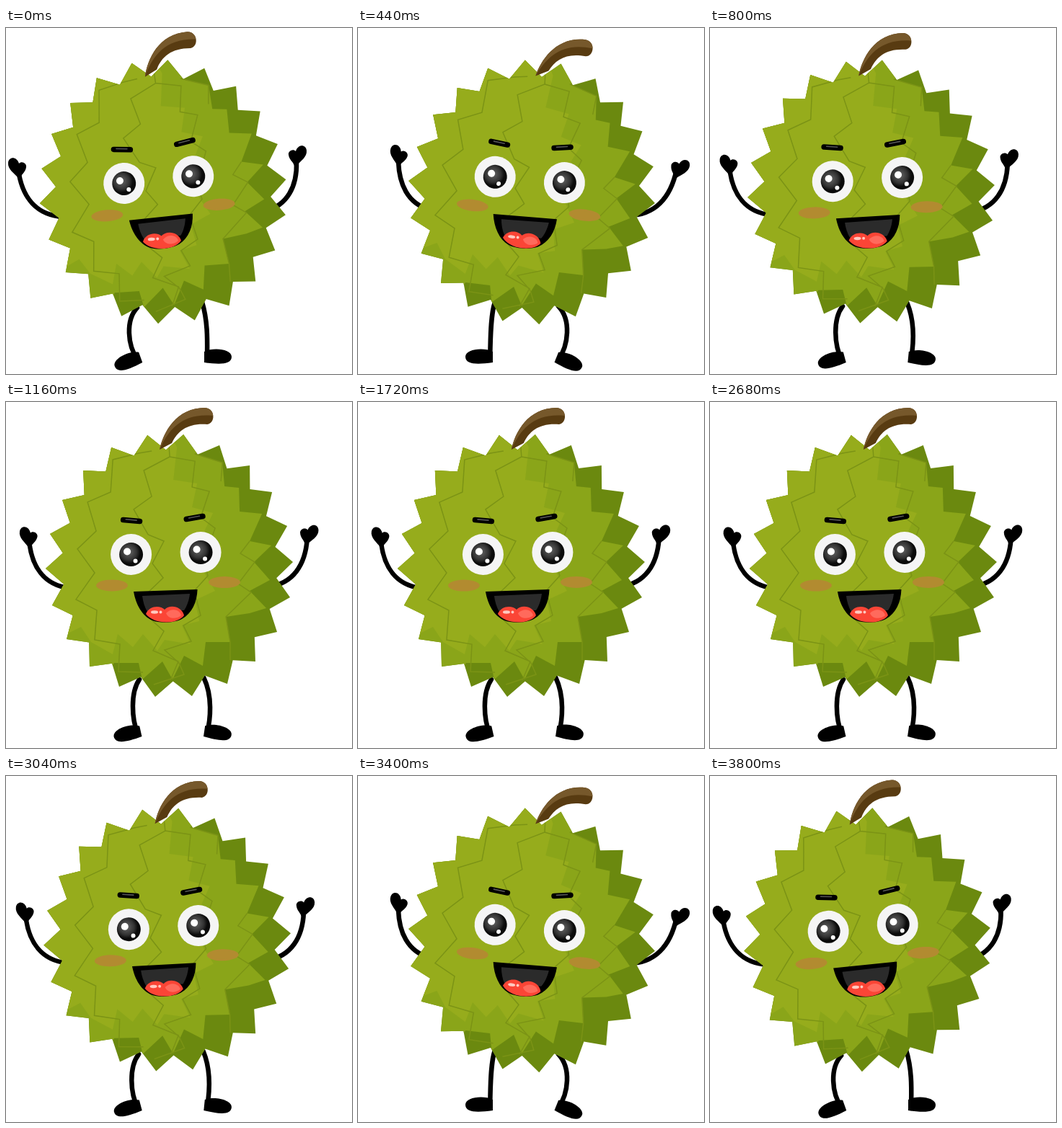
An HTML page for the animation above (3840 ms loop, 480x480 px).

```html
<!DOCTYPE html>
<html lang="en">
<head>
<meta charset="utf-8">
<title>Dancing durian</title>
<style>
  html, body { margin: 0; width: 100%; height: 100%; overflow: hidden; background: #fff; }
  svg { display: block; width: 100vw; height: 100vh; }
  .limb { fill: none; stroke: #000; stroke-width: 6.5; stroke-linecap: round; }
  .seam { fill: none; stroke: #7b9315; stroke-width: 1.5; }
</style>
</head>
<body>
<svg viewBox="0 0 480 480">
  <defs>
    <clipPath id="skin"><path class="shell"/></clipPath>
    <radialGradient id="iris" cx=".4" cy=".4" r=".6">
      <stop offset="0" stop-color="#666"/>
      <stop offset=".55" stop-color="#333"/>
      <stop offset=".8" stop-color="#0b0b0b"/>
    </radialGradient>
    <path id="hand" d="M-1 2C-6-4-16-10-15-19C-14-28-3-28 0-18C4-22 11-18 10-13C9-6 4-4 2 2Z"/>
    <path id="foot" d="M2-8C-12-15-36-11-36-1C-36 10-20 10 2 7Z"/>
    <g id="eye">
      <circle r="28.5" fill="#f5f5f5"/>
      <circle r="16.5" fill="url(#iris)"/>
      <circle cx="-5.5" cy="-4" r="5" fill="#fff"/>
      <circle cx="6" cy="9" r="3" fill="#fff"/>
    </g>
    <g id="brow" stroke-linecap="round">
      <path d="M-11.5 0H11.5" stroke="#000" stroke-width="7.5"/>
      <path d="M-8-1H7" stroke="#555" stroke-width="1.6"/>
    </g>
  </defs>

  <g id="limbs"></g>

  <g id="body">
    <path class="shell" fill="#6b890f"/>
    <g clip-path="url(#skin)">
      <path fill="#8aa519" d="M290 40L296 60L261 72L300 84L303 117L323 119L324 152L355 155L338 193L368 199L344 222L366 247L338 262L361 286L338 293L305 298L311 333L277 333L273 366L247 352L231 385L217 360L189 385L184 362L150 362L130 390H40V40Z"/>
      <path fill="#96ac1c" d="M226 40L237 63L232 108L265 113L258 146L287 154L270 190L300 200L272 232L290 262L262 275L268 304L244 310L256 336L220 330L210 345L190 322L176 340L155 322L148 350L118 333L104 312L84 322L40 300V40Z"/>
      <path class="seam" d="M202 68L184 71L148 80L147 96L145 125L113 139L125 179L99 204L123 237L97 274L126 289L123 330L158 336L156 374L190 375
        M226 62L227 76L191 95L202 131L177 149L197 184L219 193L203 224L218 244L194 267L197 298L219 318L204 345L239 360L228 386
        M227 76L262 82L258 118L282 124L270 160L290 175L274 220L280 241L261 262L270 296L246 310L257 332L220 344L240 362L247 378L205 392
        M262 72L300 84L298 110 M338 193L325 210L345 222L322 252L340 264L305 298L311 333V358"/>
    </g>

    <path fill="#583b11" d="M213 66C218 42 236 8 276 8C290 9 291 29 279 31C252 29 238 40 230 57Z"/>
    <path fill="#76582b" d="M213 66C218 42 236 8 276 8C284 9 287 14 287 19C246 15 226 36 213 66Z"/>

    <use href="#brow" transform="translate(174 164.5) rotate(5)"/>
    <use href="#brow" transform="translate(261.5 160.5) rotate(-10)"/>
    <use href="#eye" x="173.500" y="211.500"/>
    <use href="#eye" x="270" y="208.500"/>
    <g fill="#b28b30">
      <ellipse cx="147" cy="254.500" rx="22" ry="8"/>
      <ellipse cx="303" cy="250" rx="22" ry="8"/>
    </g>
    <path d="M177 263L265.500 260C265 278 258 293 244 301C232 307 212 307 203 303C189 297 180 281 177 263Z"/>
    <path fill="#2b2b2b" d="M189 269L255 266C254 275 251 283 247 289L196 291C192 284 190 277 189 269Z"/>
    <path fill="#fb4536" d="M194 294C199 282 214 282 220 288C228 280 244 284 247 296C238 309 205 309 194 294Z"/>
    <path fill="#ff6a5c" d="M222 293C230 285 241 288 243 296C236 302 225 301 222 293Z"/>
    <g fill="#ffc9c0">
      <ellipse cx="206" cy="291.500" rx="5" ry="2.200"/>
      <circle cx="214.500" cy="291.500" r="2"/>
    </g>
  </g>
</svg>
<script>
const PERIOD = 960;
const PIVOT = "226 352";

// Spike tips, clockwise; the notches sit between them, pulled towards the centre.
const tips = [
  [146, 63], [196, 46], [246, 45], [296, 60], [338, 88], [369, 125], [390, 172], [398, 222],
  [394, 271], [376, 319], [346, 360], [307, 391], [258, 408], [207, 409], [157, 395],
  [116, 367], [84, 329], [64, 282], [55, 231], [61, 183], [78, 136], [107, 95]
];
const outline = tips.flatMap(([x, y], i) => {
  const [nx, ny] = tips[(i + 1) % tips.length];
  const mx = (x + nx) / 2, my = (y + ny) / 2;
  const inset = 21 / Math.hypot(226 - mx, 228 - my);
  return [[x, y], [mx + (226 - mx) * inset, my + (228 - my) * inset]];
});
document.querySelectorAll(".shell").forEach(p => p.setAttribute("d", "M" + outline.join("L") + "Z"));

// Each limb: cubic curve and end piece [x, y, angle], both in the left and right pose.
const limbs = [
  { end: "hand", flip: 1,
    curve: [[18, 203, 24, 235, 42, 260, 80, 262], [56, 186, 57, 215, 68, 244, 100, 252]],
    place: [[18, 206, 0], [56, 189, 12]] },
  { end: "hand", flip: -1,
    curve: [[403, 186, 404, 220, 390, 246, 360, 254], [442, 196, 434, 235, 412, 262, 370, 260]],
    place: [[402, 189, 0], [441, 206, 14]] },
  { end: "foot", flip: 1,
    curve: [[182, 388, 166, 405, 168, 440, 183, 461], [190, 380, 183, 400, 184, 440, 183, 460]],
    place: [[185, 458, -20], [185, 457, 0]] },
  { end: "foot", flip: -1,
    curve: [[272, 380, 281, 410, 279, 440, 279, 461], [278, 386, 296, 405, 292, 440, 278, 460]],
    place: [[277, 457, 0], [277, 458, 22]] }
];

const add = name => document.getElementById("limbs")
  .appendChild(document.createElementNS("http://www.w3.org/2000/svg", name));
for (const limb of limbs) {
  limb.line = add("path");
  limb.line.setAttribute("class", "limb");
  limb.tip = add("use");
  limb.tip.setAttribute("href", "#" + limb.end);
}

const body = document.getElementById("body");
const mix = ([from, to], k) => from.map((v, i) => v + (to[i] - v) * k);

function draw(now) {
  const swing = Math.cos(now / PERIOD * 2 * Math.PI);
  body.setAttribute("transform", `rotate(${1.41 - 5.45 * swing} ${PIVOT})`);
  const k = (1 - swing) / 1.966;
  for (const { line, tip, curve, place, flip } of limbs) {
    const [x0, y0, ...rest] = mix(curve, k);
    line.setAttribute("d", `M${x0} ${y0}C${rest.join(" ")}`);
    const [x, y, angle] = mix(place, k);
    tip.setAttribute("transform", `translate(${x} ${y}) rotate(${angle}) scale(${flip} 1)`);
  }
}

const start = performance.now();
function tick() {
  draw(performance.now() - start);
  requestAnimationFrame(tick);
}
tick();
</script>
</body>
</html>
```
